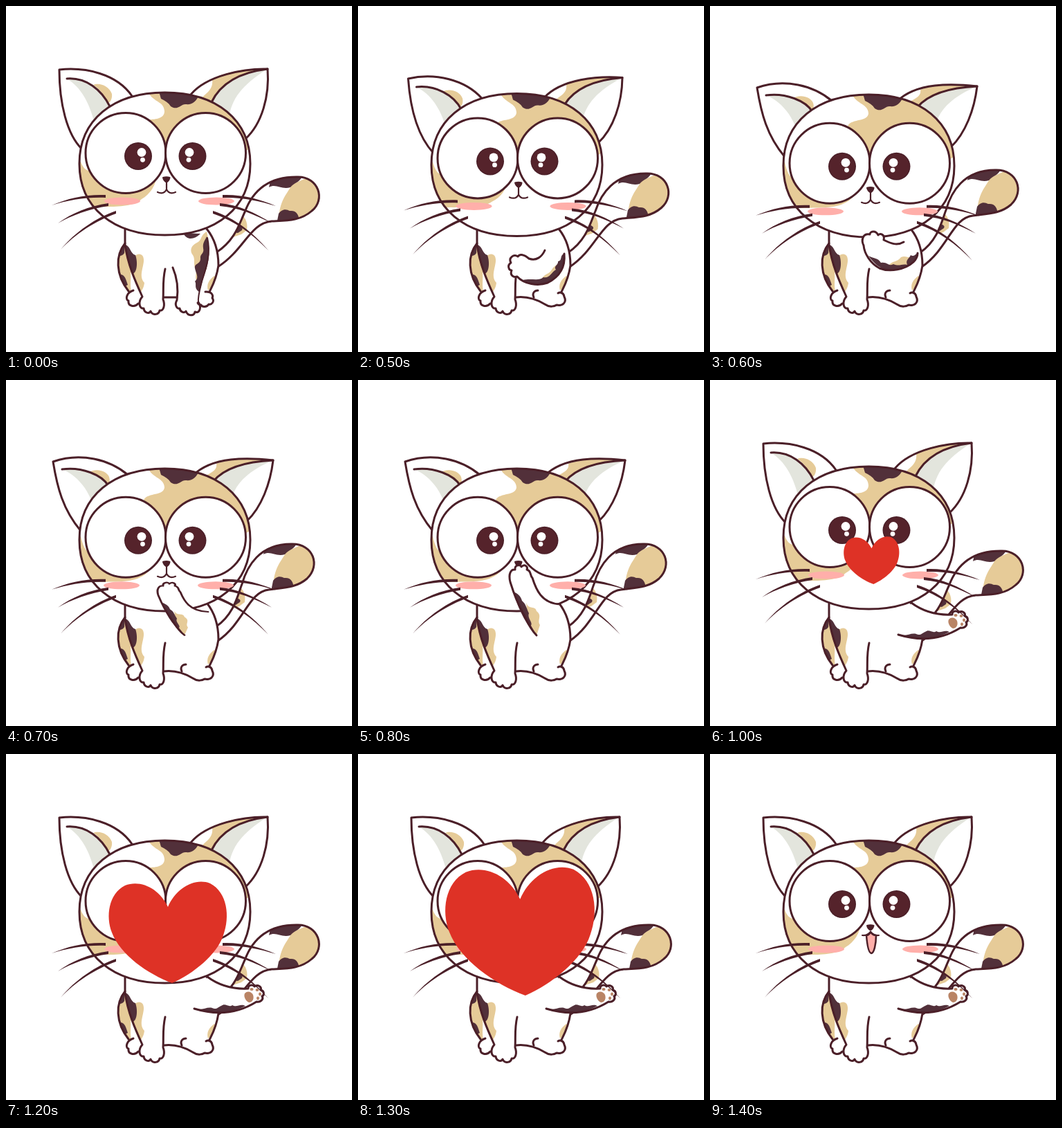
Animation of 500 by 500 pixels, one loop 2 s. Source, as an HTML page:

```html
<!DOCTYPE html>
<html lang="en">
<head>
<meta charset="utf-8">
<title>Cat blowing a kiss</title>
<style>
html, body { margin: 0; width: 100%; height: 100%; overflow: hidden; background: #fff; }
svg { display: block; width: 100%; height: 100%; }
</style>
</head>
<body>
<svg id="stage" viewBox="0 0 500 500" fill="none" stroke-linecap="round" stroke-linejoin="round"></svg>
<script>
const INK = '#4b1f28', DARK = '#52303a', TAN = '#e6cb98', GREY = '#e3e5dd',
      PINK = '#ffafaa', RED = '#de3226', PAD = '#b98465';
const LOOP = 2000;

// start time, head droop 0..1, arm pose, heart scale, mouth open
const poses = [
  [0, 0, 'rest', 0, 0],
  [500, .5, 'lift', 0, 0],
  [600, 1, 'chin', 0, 0],
  [700, 1, 'near', 0, 0],
  [800, 1, 'kiss', 0, 0],
  [900, .5, 'throw', 0, 0],
  [1000, 0, 'out', .47, 0],
  [1100, 0, 'out', .735, 0],
  [1200, 0, 'out', 1, 0],
  [1300, 0, 'out', 1.265, 0],
  [1400, 0, 'out', 0, 1]
];

const mix = (a, b, k) => {
  const to = b.match(/-?[\d.]+/g);
  let i = 0;
  return a.replace(/-?[\d.]+/g, n => +n + (to[i++] - n) * k);
};
const fill = (d, c) => `<path d="${d}" fill="${c}"/>`;
const line = (d, f = 'none', w = 3) => `<path d="${d}" fill="${f}" stroke="${INK}" stroke-width="${w}"/>`;
const dot = (x, y, r, c) => `<circle cx="${x}" cy="${y}" r="${r}" fill="${c}"/>`;
const oval = (x, y, rx, ry, c) => `<ellipse cx="${x}" cy="${y}" rx="${rx}" ry="${ry}" fill="${c}"/>`;
const move = (x, y, s) => `<g transform="translate(${x} ${y})">${s}</g>`;
const clip = (id, d, s) => `<clipPath id="${id}"><path d="${d}"/></clipPath><g clip-path="url(#${id})">${s}</g>`;

function tail(k) {
  const d = mix(
    'M304 356C332 338 338 312 345 298C353 276 372 246 422 247C452 247 462 280 442 296C425 311 405 310 384 311C352 314 345 352 306 377',
    'M304 356C330 338 335 310 341 295C348 270 366 236 414 237C444 237 455 268 435 287C420 300 403 300 380 303C350 306 345 350 306 377', k);
  const tip = fill('M413 258C408 270 394 280 394 312L465 320V235Z', TAN) +
    fill('M380 262C390 256 398 266 411 262C417 254 424 257 429 244L385 238Z', DARK) +
    fill('M391 315L394 300C400 292 406 294 410 296C419 295 424 300 424 315Z', DARK);
  const base = fill('M335 300C345 302 350 312 348 324L340 330L322 336Z', TAN) +
    fill('M324 326L330 313C336 319 344 319 341 324L335 328Z', DARK);
  return fill(d, '#fff') + clip('tail', d, move(-8 * k, -10 * k, tip) + move(-3 * k, -3 * k, base)) + line(d);
}

function body(rest) {
  let s = fill('M172 323H291C303 340 307 355 307 375C304 395 298 405 294 414L285 432L228 422L197 420L177 412C158 385 160 360 172 342Z', '#fff');
  s += fill('M172 343C160 360 158 385 177 412L192 410C180 385 175 370 172 343Z', TAN) +
    fill('M180 384L192 411L181 413C179 402 181 394 180 384Z', '#fff') +
    fill('M172 342L171 357C168 362 166 359 163 363C163 354 167 347 172 342Z', DARK) +
    fill('M165 388C172 388 173 395 176 403L172 405Z', DARK) +
    fill('M186 361C192 356 200 358 199 369C198 380 192 391 200 400C199 408 196 411 194 415C188 405 185 395 184 386Z', TAN) +
    fill('M173 345C180 348 180 358 187 360C191 371 189 386 183 387C177 376 174 362 173 345Z', DARK) +
    fill('M301 390C294 395 289 402 292 411L296 408L303 392Z', TAN);
  s += line('M172 343C158 360 158 388 177 412') +
    line('M290 322C303 338 307 355 307 375C304 395 298 405 294 413') +
    line('M184 411C174 414 172 424 177 426C176 434 186 436 191 430', '#fff');

  if (rest) {
    s += line('M228 421H247') +
      line('M288 413C297 412 300 418 298 422C302 427 297 432 293 431C290 436 283 435 282 432C279 432 278 431 277 429', '#fff') +
      fill('M256 328C261 339 272 338 281 329Z', DARK) +
      fill('M290 326C280 332 284 338 276 342C267 346 265 354 270 360C274 366 270 374 274 380C276 388 272 392 276 398L290 380L292 335Z', TAN) +
      fill('M290 333C296 348 294 370 287 387C283 398 282 408 279 413C271 408 276 402 273 398C280 392 274 386 273 379C272 371 281 374 281 365C280 358 287 358 285 350C284 342 287 340 290 333Z', DARK) +
      line('M291 335C297 360 287 385 283 398C280 410 277 420 278 428', 'none', 2) +
      line('M241 378C247 392 249 410 247 425C243 432 247 438 251 437C252 443 258 444 260 441C263 449 272 448 273 442C280 445 283 435 278 428');
  } else {
    s += line('M228 421C245 419 260 425 270 431C277 436 284 434 287 432C296 434 302 428 298 420C297 414 292 413 289 415') +
      line('M254 421C251 414 256 411 260 411');
  }
  return s + line('M172 323V345C176 373 186 396 197 420C190 428 193 438 199 437C200 444 207 445 209 441C212 448 221 446 222 440C228 441 230 432 227 424C228 409 226 397 230 380');
}

function forearm() {
  const d = 'M258 369C247 358 243 345 238 336C230 322 225 308 220 292C217 280 221 273 227 274C226 267 235 266 236 270C241 265 246 270 244 274C251 276 248 282 252 286C257 302 265 323 292 324';
  return fill(d, '#fff') +
    fill('M243 322C247 333 256 325 258 334C267 341 258 347 263 354L258 369L247 355Z', TAN) +
    fill('M225 306C231 309 235 312 237 319C243 324 243 329 247 337C244 344 253 350 250 355L258 369C246 357 232 335 225 306Z', DARK) + line(d);
}

const arms = {
  rest: () => '',
  lift() {
    const d = 'M270 353C266 362 258 369 247 365C240 359 234 358 231 362C225 358 217 364 221 371C215 375 218 382 222 382C219 389 225 393 230 391C240 402 260 405 274 400C290 392 300 379 298 358';
    return fill(d, '#fff') +
      fill('M265 395C270 386 276 388 280 381C284 374 290 374 292 369L296 378L278 399Z', TAN) +
      fill('M238 396C250 393 262 398 268 392C277 394 279 385 286 381C282 376 290 374 289 369C296 368 291 360 298 358C300 378 289 394 274 400C261 404 248 402 238 396Z', DARK) + line(d);
  },
  chin() {
    const d = 'M280 341C270 347 261 343 251 338C253 330 246 328 243 331C239 323 231 326 231 330C221 328 218 338 222 346C223 358 232 372 245 379C260 385 282 381 294 370C299 365 300 361 300 357';
    return fill(d, '#fff') +
      fill('M257 376C264 367 270 371 276 363C283 360 287 365 291 363L286 374L268 379Z', TAN) +
      fill('M229 361C238 366 242 363 247 371C256 369 258 377 265 373C274 377 277 372 285 374C282 367 288 365 290 360C294 363 297 359 300 357C300 371 281 383 260 382C246 381 236 371 229 361Z', DARK) + line(d);
  },
  near: () => `<g transform="translate(0 92) scale(1 .75)">${forearm()}</g>`,
  kiss: forearm,
  throw() {
    const d = 'M258 369C252 345 256 325 266 306C262 296 268 290 273 293C275 285 284 285 286 290C293 286 299 293 296 299C304 305 299 318 293 324';
    return fill(d, '#fff') +
      fill('M256 330C265 334 260 343 269 348L266 358L258 369Z', TAN) +
      fill('M258 322C264 333 257 338 262 346C260 353 264 358 258 369C253 350 254 336 258 322Z', DARK) + line(d);
  },
  out() {
    const d = 'M291 322C310 336 330 340 350 339C350 333 357 333 359 336C364 332 370 337 368 341C374 342 373 349 370 350C373 355 367 359 362 358C335 375 305 378 272 368';
    return fill(d, '#fff') +
      fill('M274 368C284 371 290 365 298 367C304 370 306 366 311 364C317 359 322 367 327 363C334 367 338 360 346 364C324 376 295 376 274 368Z', DARK) + line(d) +
      fill('M345 346C349 341 355 344 357 348C359 354 356 359 351 359C346 357 343 350 345 346Z', PAD) +
      oval(355, 340, 2.6, 2, PAD) + oval(363, 341, 2.4, 2, PAD) + oval(367, 347, 2, 2.4, PAD) + oval(364, 353, 2, 2.4, PAD);
  }
};

function ears(k) {
  const left = mix('M110 207C88 186 77 140 77 92C115 88 160 98 182 130', 'M108 218C82 187 74 155 68 118C108 104 150 115 176 137', k);
  const leftIn = mix('M88 105C116 103 138 121 150 145', 'M81 129C109 125 139 137 148 153', k);
  const right = mix('M267 128C290 100 345 90 378 91C381 130 370 170 346 192', 'M270 138C298 110 350 112 386 116C382 150 369 184 348 204', k);
  const rightIn = mix('M378 91C345 95 312 108 297 139', 'M386 116C345 118 315 128 300 146', k);
  return fill(left, '#fff') +
    fill(mix('M88 105C108 117 121 140 128 170L150 145C138 121 116 103 88 105Z', 'M81 129C103 138 118 157 126 181L148 153C139 137 109 125 81 129Z', k), GREY) +
    fill(mix('M126 114C134 110 149 115 153 127C154 134 150 141 147 140C141 127 134 119 126 114Z', 'M119 134C128 127 145 130 149 140C151 147 149 151 146 150C139 140 128 135 119 134Z', k), TAN) +
    line(left) + line(leftIn) + fill(right, '#fff') +
    fill(mix('M298 105C322 94 350 90 378 91C345 95 312 108 297 139L280 136C290 124 300 122 298 105Z', 'M304 121C328 112 358 113 386 116C345 118 315 128 300 146L282 142C293 135 306 132 304 121Z', k), TAN) +
    fill(mix('M376 92C345 95 312 108 297 139L322 164C325 134 342 114 376 92Z', 'M384 117C345 118 315 128 300 146L326 172C332 148 353 130 384 117Z', k), GREY) +
    line(right) + line(rightIn);
}

// slightly squarer than an ellipse
function skull(cx, cy, rx, ry, q = .61) {
  const l = cx - rx, r = cx + rx, t = cy - ry, b = cy + ry, x = rx * q, y = ry * q;
  return `M${l} ${cy}C${l} ${cy - y} ${cx - x} ${t} ${cx} ${t}S${r} ${cy - y} ${r} ${cy}S${cx + x} ${b} ${cx} ${b}S${l} ${cy + y} ${l} ${cy}Z`;
}

function head(k) {
  const shape = skull(229.5, 228 + 3 * k, 123.5, 103);
  const marks =
    fill(mix('M203 120C212 141 228 136 229 152C229 164 213 164 205 164L232 212L345 210L365 200V110Z', 'M203 123C210 143 228 140 229 155C228 168 206 162 199 173L232 226L345 222L365 212V110Z', k), TAN) +
    move(0, 3 * k, fill('M220 120L224 134C230 137 235 140 238 145C248 152 253 141 260 142C268 143 276 139 280 125Z', DARK)) +
    fill(mix('M95 224L108 225C111 234 116 238 121 238L173 212L219 240C217 260 208 272 196 279C182 292 150 290 127 290H95Z', 'M95 224L108 226C111 240 116 249 122 250L173 227L215 258C213 270 205 281 192 286C178 293 150 291 127 292H95Z', k), TAN);
  return fill(shape, '#fff') + clip('skull', shape, marks) + line(shape);
}

function eyes() {
  const eye = x => `<circle cx="${x}" cy="212.5" r="58" fill="#fff" stroke="${INK}" stroke-width="3"/>`;
  const pupil = (x, glint) => dot(x, 217, 20, INK) + dot(x, 217, 18.5, '#55232b') +
    dot(x + glint, 211.5, 6.4, '#fff') + dot(x + glint + (glint > 0 ? 1.5 : -1), 222.3, 3.4, '#fff');
  return eye(173) + eye(288.5) + pupil(191, 5) + pupil(269.5, -4.5);
}

function muzzle(open) {
  const nose = line('M227 248Q232 246.5 236.5 248Q236 252.5 232 254.5Q228 252.5 227 248Z', INK, 2);
  const mouth = open
    ? line('M226 262C227 275 229 287 233 288C237 288 240 275 240 262Q235 262 232 257Q230 262 226 262Z', PINK, 2.5) +
      line('M220 262Q227 263 232 257Q237 263 244 262', 'none', 2.2)
    : line('M232 254V265M219 269Q228 273 232 265Q236 273 245 269', 'none', 2.2);
  return nose + mouth;
}

function whiskers() {
  const hair = (x, y, a, b, c, d, ex, ey) =>
    fill(`M${x} ${y - 2}C${a} ${b - 2} ${c} ${d - 1.6} ${ex} ${ey}C${c} ${d + 1.6} ${a} ${b + 2} ${x} ${y + 2}Z`, INK);
  return hair(144, 275, 115, 274, 90, 279, 66, 288) + hair(148, 287, 120, 291, 95, 301, 75, 314) +
    hair(159, 298, 130, 308, 100, 328, 79, 352) + hair(313, 275, 340, 274, 366, 280, 390, 289) +
    hair(309, 287, 335, 289, 360, 300, 384, 314) + hair(299, 298, 330, 308, 356, 328, 379, 353);
}

function heart(s) {
  const d = 'M234 221C222 195 195 181 172 190C148 202 144 235 153 258C165 290 205 318 240 331C270 318 305 290 314 262C324 235 320 200 295 187C272 178 245 195 234 221Z';
  return s ? `<g transform="translate(233 263) scale(${s}) translate(-233 -263)">${fill(d, RED)}</g>` : '';
}

function draw([, k, pose, love, open]) {
  const drop = 14.8 * k;
  const arm = arms[pose]();
  const front = ['chin', 'near', 'kiss', 'throw'].includes(pose);
  const blush = oval(168, 282, 26, 5.5, PINK) + oval(304, 282, 26, 5.5, PINK);
  return tail(k) + body(pose === 'rest') + (front ? '' : arm) + ears(k) + head(k) +
    move(0, drop, eyes() + move(-1 * k, 0, blush) + muzzle(open)) +
    (front ? arm : '') + move(0, drop, whiskers()) + heart(love);
}

const stage = document.getElementById('stage');
const start = performance.now();
let shown;

function tick(now) {
  const t = Math.max(0, now - start) % LOOP;
  const pose = poses.filter(p => p[0] <= t).pop();
  if (pose !== shown) stage.innerHTML = draw(shown = pose);
  requestAnimationFrame(tick);
}
tick(start);
</script>
</body>
</html>
```
